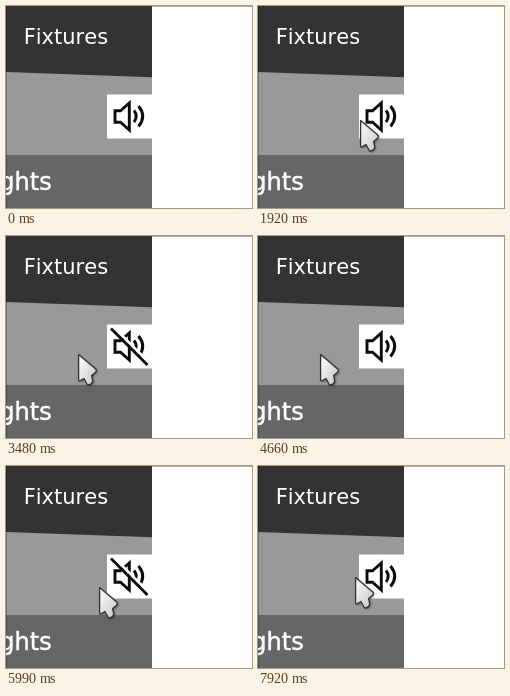
Animation, 246 px wide and 202 px high, one loop 8000 ms. Source, as an HTML page:

```html
<!DOCTYPE html>
<html lang="en">
<head>
<meta charset="utf-8">
<title>Mute button</title>
<style>
  html, body { margin: 0; width: 100%; height: 100%; overflow: hidden; background: #fff; }
  svg { display: block; width: 246px; height: 202px; }
  text { font-family: Verdana, "DejaVu Sans", sans-serif; fill: #fff; font-kerning: none; }
  .ink { fill: none; stroke: #0c0c0c; stroke-width: 2.9; }
  .shade { fill: #000; opacity: .55; filter: url(#soft); }
  .skin { stroke: #333; stroke-width: 1.3; stroke-linejoin: round; }
</style>
</head>
<body>
<svg viewBox="0 0 246 202">
  <defs>
    <linearGradient id="steel" x1="0" y1="0" x2="1" y2="1">
      <stop offset=".2" stop-color="#f4f4f4"/>
      <stop offset="1" stop-color="#c4c4c4"/>
    </linearGradient>
    <linearGradient id="glove" x1="0" y1="0" x2="0" y2="1">
      <stop offset=".5" stop-color="#f0f0f0"/>
      <stop offset="1" stop-color="#a4a4a4"/>
    </linearGradient>
    <filter id="soft" x="-30%" y="-30%" width="160%" height="160%">
      <feGaussianBlur stdDeviation="1"/>
    </filter>
    <path id="dart" d="M.6 .6L18.3 15.6Q18.8 17.3 17.3 18.5L13.6 21.5L14.8 27Q14 30.8 9.5 31L6 24.5L1.4 27Q.6 27 .6 25.5Z"/>
    <path id="fist" d="M-4.6 17V3Q-4.2 .6-2 .6Q.6 .6 1 3V12Q4 10.8 6.5 12.6Q9.5 11.6 11.5 13.8Q15.6 14 15.6 18V24Q15 32 8 32.6H-1Q-5.5 32-7.5 27L-10.4 20.5Q-11 17-8 16.6Q-6 16.6-4.6 19Z"/>
  </defs>

  <rect width="146" height="202" fill="#999"/>
  <path d="M0 0H146V71.2L0 66Z" fill="#333"/>
  <rect y="149" width="146" height="53" fill="#666"/>
  <path d="M.5 0V202" stroke="#000" opacity=".25"/>
  <path d="M146 .5H246" stroke="#b0b0b0"/>
  <text x="17.7" y="38" font-size="21">Fixtures</text>
  <text x="45.7" y="184" font-size="24" text-anchor="end" stroke="#fff" stroke-width=".5">Highlights</text>

  <rect x="101" y="88.5" width="45" height="44" fill="#fff"/>
  <path class="ink" d="M109 104.8H114.5L123.3 97V124L114.5 116.2H109Z"/>
  <path class="ink" d="M128 104.5Q132.5 110.3 128 116M132.5 100Q141 110.3 132.5 120.5"/>
  <g id="slash">
    <path d="M107.5 91L143.5 127" stroke="#fff" stroke-width="2.5"/>
    <path class="ink" d="M105 92.5L141.5 129"/>
  </g>

  <g id="arrow">
    <use href="#dart" class="shade" x="1" y="1"/>
    <use href="#dart" class="skin" fill="url(#steel)"/>
  </g>
  <g id="hand">
    <use href="#fist" class="shade" x=".8" y="1.5"/>
    <use href="#fist" class="skin" fill="url(#glove)"/>
    <path d="M1 12V17M6.3 12.8V17M11.3 14V18" fill="none" stroke="#888" stroke-width=".8"/>
  </g>
</svg>
<script>
  const LOOP = 8000, STEP = 75, BUTTON_EDGE = 111;
  const home = [22, 130];

  // start time, number of steps, place to reach
  const trips = [
    [760, 3, 138, 113], [990, 2, 125, 109],
    [1620, 2, 85, 113], [1770, 1, 94, 116],
    [1920, 3, 125, 109], [2780, 3, 66, 119],
    [3480, 5, 125, 109], [3940, 1, 121, 113],
    [4110, 2, 77, 117], [4660, 2, 46, 119],
    [5130, 5, 131, 109], [5920, 2, 54, 132],
    [6680, 4, 125, 107], [7070, 1, 126, 110],
    [7220, 4, 69, 116], [7920, 1, 97, 111]
  ];
  const clicks = [2400, 3860, 5600, 6990];

  const el = id => document.getElementById(id);
  const show = (id, on) => el(id).setAttribute("visibility", on ? "visible" : "hidden");
  const ease = u => u * u * (3 - 2 * u);

  function pointer(t) {
    const i = trips.findLastIndex(trip => trip[0] <= t);
    if (i < 0) return null;
    const [at, steps, ...to] = trips[i];
    const from = i ? trips[i - 1].slice(2) : home;
    const k = Math.min(steps, Math.floor((t - at) / STEP) + 1);
    return to.map((v, axis) => Math.round(from[axis] + (v - from[axis]) * ease(k / steps)));
  }

  // Hovering previews the other state, but not right after a click.
  function isMuted(t, over) {
    const done = clicks.filter(c => c <= t);
    const off = done.length % 2 === 1;
    const fresh = done.length > 0 && t - done.at(-1) < 400;
    return over ? !off && !fresh : off;
  }

  function draw(t) {
    const spot = pointer(t);
    const over = spot !== null && spot[0] >= BUTTON_EDGE;
    show("slash", isMuted(t, over));
    show("hand", over);
    show("arrow", spot && !over);
    if (spot) el(over ? "hand" : "arrow").setAttribute("transform", `translate(${spot})`);
  }

  const start = performance.now();
  function tick() {
    draw((performance.now() - start) % LOOP);
    requestAnimationFrame(tick);
  }
  tick();
</script>
</body>
</html>
```
